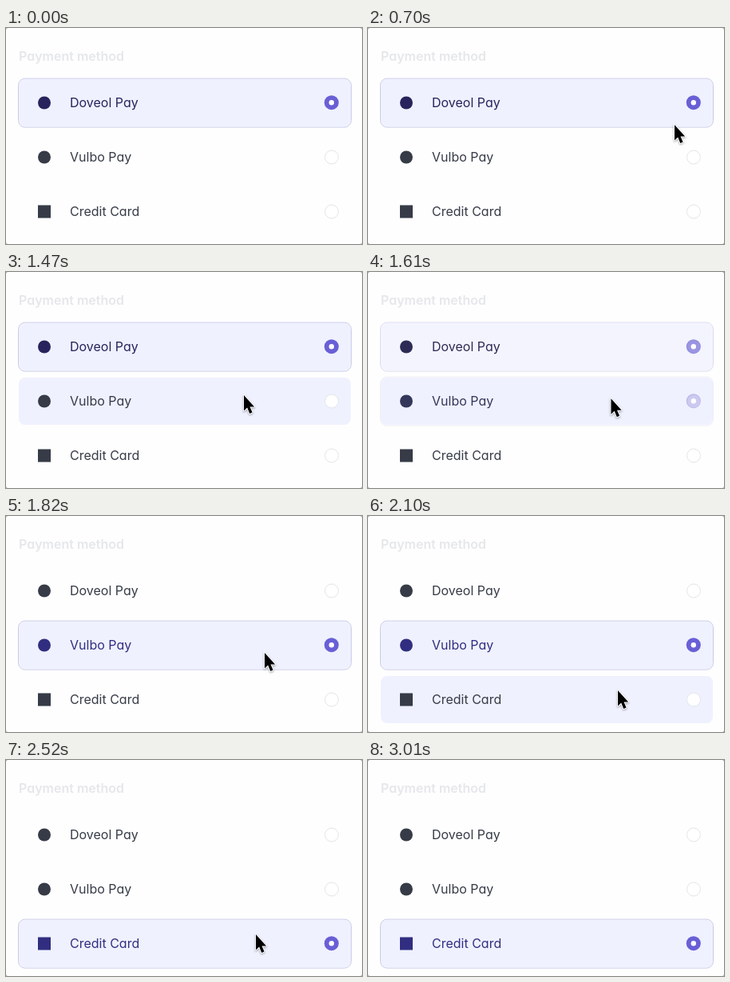
An HTML page for the animation above (3.85 s loop, 446x270 px).

```html
<!DOCTYPE html>
<html lang="en">
<head>
<meta charset="utf-8">
<title>Payment method</title>
<style>
  html, body { margin: 0; width: 100%; height: 100%; overflow: hidden; background: #999; }
  svg { display: block; width: 446px; height: 270px; font: 16px Inter, sans-serif; font-feature-settings: "cv11"; }
  .title { font-weight: 600; fill: #e5e7eb; }
  .fill { fill: #eff1ff; }
  .ring { fill: none; stroke: #c9cbe8; }
  .radio { fill: #fff; stroke: #e3e5e9; }
  .on { fill: #695fd6; }
  .dot { fill: #fff; }
  #cursor { filter: drop-shadow(0 1px 1px rgba(0, 0, 0, .35)); }
  #cursor path { stroke: #fff; stroke-width: 2; stroke-linejoin: round; paint-order: stroke; }
</style>
</head>
<body>
<svg viewBox="0 0 446 270">
  <rect width="446" height="270" rx="2.5" fill="#fefefe"/>
  <text class="title" x="16" y="41">Payment method</text>
  <g id="rows"></g>
  <g id="cursor"><path d="M1 2V21.5L5.2 17.6 8.3 25 11.6 23.6 8.5 16.4H14.2Z"/></g>
</svg>
<script>
const LOOP = 3850, STEP = 70, FADE = 210, PITCH = 68;
const INK = '#363b47';

const rows = [
  { label: 'Doveol Pay', ink: '#28235c', corner: 8 },
  { label: 'Vulbo Pay', ink: '#312e81', corner: 8 },
  { label: 'Credit Card', ink: '#312e81', corner: 0 },
];

// Row i is selected or hovered from entry i until entry i + 1.
const selectTimes = [-FADE, 1540, 2310, LOOP];
const hoverTimes = [-FADE, 1120, 1890, 2940];

// The pointer rests between moves.
const start = { x: 413, y: 249 };
const moves = [
  { at: 560, over: 140, x: 383, y: 119 },
  { at: 700, over: 140, x: 306, y: 93 },
  { at: 980, over: 350, x: 298, y: 159 },
  { at: 1400, over: 70, x: 297, y: 152 },
  { at: 1540, over: 280, x: 323, y: 169 },
  { at: 1820, over: 140, x: 312, y: 216 },
  { at: 2870, over: 70, x: 312, y: 234 },
];
const pointerVisible = t => (t >= 70 && t < 140) || (t >= 700 && t < 3010);

const ramp = (t, at, over) => Math.min(1, Math.max(0, (t - at) / over));
const active = (t, times, i) => ramp(t, times[i], FADE) - ramp(t, times[i + 1], FADE);

const list = document.getElementById('rows');
const cursor = document.getElementById('cursor');

list.innerHTML = rows.map((row, i) => `
  <g transform="translate(0 ${64 + PITCH * i})">
    <rect class="fill" x="16" width="416" height="59" rx="8"/>
    <rect class="ring" x="15.5" y="-.9" width="417" height="61" rx="8.5"/>
    <g class="ink">
      <rect x="40" y="21.5" width="16" height="16" rx="${row.corner}"/>
      <text x="80" y="35">${row.label}</text>
    </g>
    <circle class="radio" cx="408" cy="29.5" r="8.5"/>
    <g class="check">
      <circle class="on" cx="407.8" cy="29.2" r="9"/>
      <circle class="dot" cx="407.8" cy="29.2" r="3.2"/>
    </g>
  </g>`).join('');

const views = [...list.children].map(group => ({
  fill: group.querySelector('.fill'),
  ring: group.querySelector('.ring'),
  ink: group.querySelector('.ink'),
  check: group.querySelector('.check'),
}));

function pointerAt(t) {
  return moves.reduce((from, move) => {
    const p = ramp(t, move.at, move.over);
    return { x: from.x + (move.x - from.x) * p, y: from.y + (move.y - from.y) * p };
  }, start);
}

function draw(t) {
  rows.forEach((row, i) => {
    const selected = active(t, selectTimes, i);
    const hovered = active(t, hoverTimes, i);
    const view = views[i];
    view.fill.style.opacity = Math.max(selected, hovered);
    view.ring.style.opacity = view.check.style.opacity = selected;
    view.ink.style.fill = `color-mix(in srgb, ${row.ink} ${selected * 100}%, ${INK})`;
  });
  const { x, y } = pointerAt(t);
  cursor.setAttribute('transform', `translate(${x} ${y})`);
  cursor.style.display = pointerVisible(t) ? '' : 'none';
}

const origin = performance.now();
function tick() {
  const t = (performance.now() - origin) % LOOP;
  draw(Math.floor(t / STEP) * STEP);
  requestAnimationFrame(tick);
}
tick();
</script>
</body>
</html>
```
